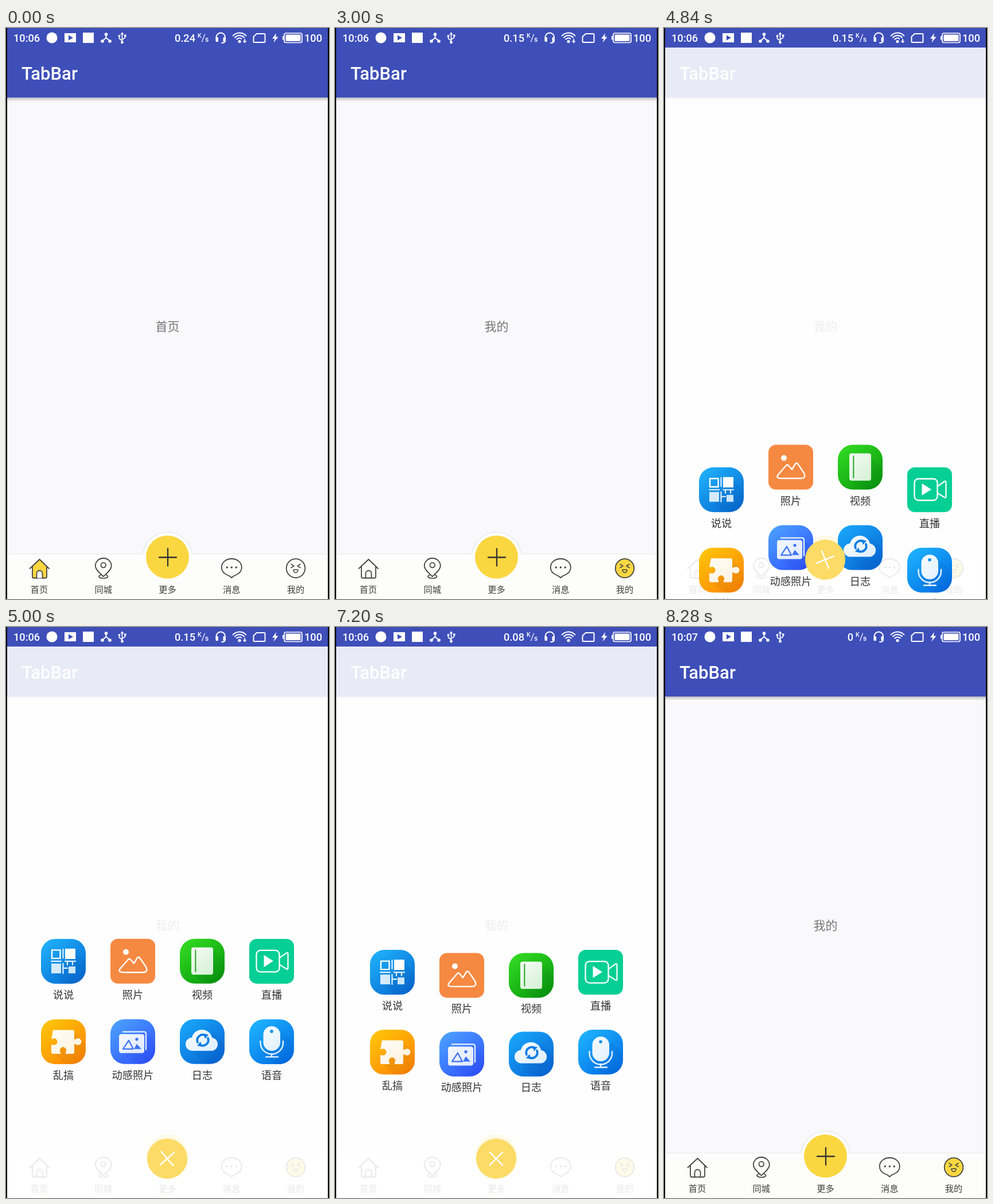
Recreate the animation shown at these times as an HTML page with a canvas. Size 563 by 994 pixels, loop 8.32 s.

```html
<!DOCTYPE html>
<html lang="zh">
<head>
<meta charset="utf-8">
<style>
html, body { margin: 0; width: 100%; height: 100%; overflow: hidden; background: #fafafa; }
canvas { display: block; }
</style>
</head>
<body>
<canvas id="stage" width="563" height="994"></canvas>
<script>
const W = 563, H = 994, LOOP = 8320;
const ctx = document.getElementById('stage').getContext('2d');
const CJK = '"Noto Sans CJK SC", "Noto Sans CJK", sans-serif';
const LATIN = 'Roboto, sans-serif';
const BLUE = '#3e4fb9', YELLOW = '#fad741', INK = '#444';
const TABS = ['首页', '同城', '更多', '消息', '我的'];

const clamp = (v, lo = 0, hi = 1) => Math.min(hi, Math.max(lo, v));

function fill(path, color) {
  ctx.fillStyle = color;
  ctx.fill(typeof path === 'string' ? new Path2D(path) : path);
}
function stroke(path, color, width) {
  ctx.strokeStyle = color;
  ctx.lineWidth = width;
  ctx.stroke(typeof path === 'string' ? new Path2D(path) : path);
}
function rect(x, y, w, h, color) {
  ctx.fillStyle = color;
  ctx.fillRect(x, y, w, h);
}
function round(x, y, w, h, r) {
  const p = new Path2D();
  p.roundRect(x, y, w, h, r);
  return p;
}
function circle(x, y, r) {
  const p = new Path2D();
  p.arc(x, y, r, 0, Math.PI * 2);
  return p;
}
function text(str, x, y, font, color, align = 'left') {
  ctx.font = font;
  ctx.fillStyle = color;
  ctx.textAlign = align;
  ctx.fillText(str, x, y);
}
function diagonal(from, to, size = 78) {
  const g = ctx.createLinearGradient(size * 0.1, 0, size * 0.9, size);
  g.addColorStop(0, from);
  g.addColorStop(1, to);
  return g;
}
function at(x, y, draw) {
  ctx.save();
  ctx.translate(x, y);
  draw();
  ctx.restore();
}

// Status bar
function drawStatus(t) {
  const white = '#fff', font = '500 18.2px ' + LATIN;
  rect(0, 0, W, 34, BLUE);
  text(t < 8240 ? '10:06' : '10:07', 13, 24, font, white);
  fill(circle(80, 17, 9.5), white);
  fill('M102 9H122V25H102Z', white);
  fill('M109 12.5L117 17L109 21.5Z', BLUE);
  fill('M134 8H153V26H134Z', white);

  stroke('M174.5 11V17L168 22.5M174.5 17L181 22.5', white, 2);
  for (const [x, y] of [[174.5, 11], [168, 23], [181, 23]]) fill(circle(x, y, 2.8), white);

  stroke('M202.5 10V25M202.5 22L197.5 18.5V14M202.5 20L207.5 17V13', white, 1.6);
  fill('M202.5 7L205.5 11.5H199.5ZM206 11.5H209.5V15H206Z', white);
  fill(circle(197.5, 14, 2), white);
  fill(circle(202.5, 25, 2.4), white);

  const speed = t < 2240 ? '0.24' : t < 5240 ? '0.15' : t < 8240 ? '0.08' : '0';
  text(speed, 330, 24, font, white, 'right');
  text('K', 334, 17, '500 10.5px ' + LATIN, white);
  text('s', 347, 24, '500 12px ' + LATIN, white);
  stroke('M341.5 24L346.5 11', white, 1.2);

  stroke('M366.5 19V15.5A7.8 7.8 0 0 1 382 15.5V22Q382 26 376 26', white, 2);
  fill(round(365.5, 16, 4.5, 8, 1.5), white);
  fill(round(378.5, 16, 4.5, 8, 1.5), white);

  for (const r of [6.5, 11, 15.5]) {
    const arc = new Path2D();
    arc.arc(407, 24, r, -Math.PI * 0.76, -Math.PI * 0.24);
    stroke(arc, white, 2.1);
  }
  fill(circle(407, 23.5, 2.6), white);
  if (t < 5800) {
    rect(411, 18, 10, 9, BLUE);
    fill('M415.2 19H417V22.5H419.5L416 26.5L412.7 22.5H415.2Z', white);
  }
  stroke('M437 10H450Q451.5 10 451.5 11.5V23.5Q451.5 25 450 25H433Q431.5 25 431.5 23.5V15Z', white, 2);
  fill('M471 9L464 18.5H468.5L466.5 25.5L474.5 15.5H470Z', white);
  stroke(round(485, 9, 31, 16.5, 3), white, 1.7);
  fill(round(487.5, 11.5, 26, 11.5, 1), white);
  rect(482, 14, 2.5, 6.5, white);
  text('100', 520, 24, font, white);
}

// Tab bar icons, each centred on its own origin
const tabIcons = {
  0(tone) {
    const body = 'M-12 -3V14.5Q-12 17 -9.5 17H10.5Q13 17 13 14.5V-3L0.5 -15Z';
    if (tone) fill(body, tone);
    stroke('M-16.5 0.5L0.5 -15.5L17 0.5M-12 -3V14.5Q-12 17 -9.5 17H10.5Q13 17 13 14.5V-3', INK, 1.8);
    const door = 'M-4.5 17V9A5 5 0 0 1 5.5 9V17';
    if (tone) fill(door, '#fdfdfc');
    stroke(door, INK, 1.8);
  },
  1(tone) {
    const pin = 'M0 14.5C-5 9 -14 3 -14 -4A14 13.5 0 0 1 14 -4C14 3 5 9 0 14.5Z';
    if (tone) fill(pin, tone);
    stroke(pin, INK, 1.8);
    if (tone) fill(circle(0, -5.5, 4.3), '#fdfdfc');
    stroke(circle(0, -5.5, 4.3), INK, 1.7);
    stroke('M-4.5 11.5C-11 14 -7 17.5 0 17.5S11 14 4.5 11.5', INK, 1.7);
  },
  3(tone) {
    const bubble = 'M0 16.5Q-4 12.5 -8 11.5C-14 9 -17.5 4 -17.5 -1.5C-17.5 -10.5 -9.5 -16.5 0 -16.5S17.5 -10.5 17.5 -1.5C17.5 4 14 9 8 11.5Q4 12.5 0 16.5Z';
    if (tone) fill(bubble, tone);
    stroke(bubble, INK, 1.8);
    for (const x of [-8, 0, 8]) fill(circle(x, -1.5, 1.7), INK);
  },
  4(tone) {
    if (tone) fill(circle(0, 0, 16.3), tone);
    stroke(circle(0, 0, 16.3), INK, 1.8);
    stroke('M-8 -7L-3 -4L-8 -1M8 -7L3 -4L8 -1', INK, 1.6);
    stroke('M-3.8 2.5H3.8V3.5A3.8 4 0 0 1 -3.8 3.5Z', INK, 1.6);
  }
};

function drawPage(t) {
  const active = t < 1880 ? 0 : t < 2520 ? 1 : t < 2960 ? 3 : 4;
  rect(0, 0, W, H, '#f9f9fb');
  const shadow = ctx.createLinearGradient(0, 121, 0, 128);
  shadow.addColorStop(0, 'rgba(0,0,0,.24)');
  shadow.addColorStop(1, 'rgba(0,0,0,0)');
  rect(0, 121, W, 7, shadow);
  rect(0, 34, W, 87, BLUE);
  text('TabBar', 27, 90, '500 31px ' + LATIN, '#fff');
  text(TABS[active], 281.5, 527, '350 21px ' + CJK, '#757575', 'center');

  stroke(circle(281.5, 921, 43), '#ebecf1', 2.5);
  rect(0, 915, W, 79, '#fdfdfc');
  rect(0, 915, W, 1.3, '#ebecf0');
  fill(circle(281.5, 921, 42.5), '#fdfdfd');
  fill(circle(281.5, 921, 37.5), YELLOW);
  stroke('M267 921.5H297M282 906.5V936.5', '#333', 2.3);

  TABS.forEach((label, i) => {
    const x = 58 + i * 111.75;
    if (tabIcons[i]) at(x, 940.5, () => tabIcons[i](i === active && YELLOW));
    text(label, x, 983, '15.2px ' + CJK, '#3c3c3c', 'center');
  });
}

// Menu tiles on a 78 x 78 grid
const TILES = [
  { label: '说说', colors: ['#20b2fb', '#0568d0'], radius: 25, draw() {
    stroke('M19 19.5H33.5V34H19Z', '#fff', 2.4);
    rect(42, 17, 18, 18, '#fff');
    rect(18, 43, 17, 17, '#d5ebfd');
    rect(48, 48, 12, 12, '#cde6fc');
    stroke('M38.5 18V33M18 39H35M42 39H60M46 39V45M55 39V45M38.5 43V60M38.5 51H46', '#e3f2fe', 2.2);
  } },
  { label: '照片', colors: ['#f68942', '#f68942'], radius: 13, draw() {
    fill(circle(27, 23, 5), '#fff');
    stroke('M17 52L31 36Q33 34 35 36L41 43L47 33Q49 31 51 33L62 49Q66 58 57 58.5H22Q12 58 17 52Z', '#fff', 2.4);
  } },
  { label: '视频', colors: ['#34dd24', '#06950a'], radius: 26, draw() {
    fill(round(20, 15, 38, 47.5, 4), diagonal('#fff', '#c9edc9'));
    rect(26.5, 19, 1.8, 39, '#169b14');
  } },
  { label: '直播', colors: ['#05cf95', '#05cf95'], radius: 13, draw() {
    stroke(round(12.5, 20, 40, 37.5, 7), '#fff', 2.3);
    stroke('M53 33L65 24.5Q67.5 23.5 67.5 26V51Q67.5 53.5 65 52.5L53 45', '#fff', 2.2);
    fill('M25.5 28L42 38.5L25.5 49Z', '#fff');
  } },
  { label: '乱搞', colors: ['#ffc60a', '#ff8300'], radius: 24, draw() {
    fill('M21 18.5H55Q58 18.5 58 21.5V35L61 34.5A5.8 5.8 0 1 1 61 43.5L58 43V57Q58 60 55 60H43V57A5.5 5.5 0 1 0 34 57V60H21Q18 60 18 57V44L21 44.5A5.8 5.8 0 1 0 21 33.5L18 34Z',
      diagonal('#fff', '#fff0d8'));
  } },
  { label: '动感照片', colors: ['#4ba2ff', '#3050ff'], radius: 25, draw() {
    stroke('M22 22H58Q62 22 62 26V53', '#e6efff', 2.3);
    fill(round(15, 26, 44, 33, 4), diagonal('#fff', '#d5e2ff'));
    stroke('M22 52L32 37L40 52Z', '#3d72f5', 2.2);
    fill('M41 52L46 43L54 52Z', '#3d72f5');
    fill(circle(46, 35, 2.6), '#3d72f5');
  } },
  { label: '日志', colors: ['#19a8fa', '#0764d4'], radius: 25, draw() {
    fill('M22 55A11.5 11.5 0 0 1 21 32A18 18 0 0 1 56 32A11.7 11.7 0 0 1 57 55Z', diagonal('#fff', '#d6eafd'));
    stroke('M31 40A9.5 9.5 0 0 1 44 28M49 33A9.5 9.5 0 0 1 36 45', '#0d7de2', 3.8);
    fill('M41 25L50 27L44 34ZM39 48L30 46L36 39Z', '#0d7de2');
  } },
  { label: '语音', colors: ['#1fb5ff', '#006be4'], radius: 25, draw() {
    fill(round(24.5, 12, 29.5, 43, 14.8), diagonal('#fff', '#d5ecff'));
    fill(circle(39, 21, 2.8), '#1290ef');
    stroke('M19.5 38V41A19.7 19.5 0 0 0 59 41V38M39 60V65M29 65.5H50', '#e8f4ff', 2.4);
  } }
];

// Remaining distance of a damped spring, from 1 to 0
function spring(ms) {
  const a = Math.max(0, ms) * 0.0116;
  return Math.exp(-1.07 * a) * (Math.cos(a) + 1.07 * Math.sin(a));
}

// Row by row, inner columns leave before the outer ones
const EXITS = {
  inner: [{ start: 7175, pull: 0.0095 }, { start: 7180, pull: 0.0078 }],
  outer: [{ start: 7188, pull: 0.0064 }, { start: 7199, pull: 0.0048 }]
};

function tileOffset(row, col, t) {
  const side = col === 1 || col === 2 ? 'inner' : 'outer';
  const exit = EXITS[side][row];
  const enter = 528 * spring(t - (side === 'inner' ? 4727 : 4739));
  return enter + exit.pull * Math.max(0, t - exit.start) ** 2;
}

function drawTile(tile, x, y) {
  at(x, y, () => {
    const plate = round(0, 0, 78, 78, tile.radius);
    fill(plate, diagonal(...tile.colors));
    if (tile.colors[0] !== tile.colors[1]) {
      ctx.save();
      ctx.clip(plate);
      fill('M58 22L80 44V80H44L22 58Z', 'rgba(0,30,90,.05)');
      ctx.restore();
    }
    tile.draw();
    text(tile.label, 39, 104, '18.2px ' + CJK, '#333', 'center');
  });
}

function drawMenu(t) {
  const alpha = Math.min(clamp((t - 4610) / 120), clamp((7570 - t) / 120));
  if (t < 4640 || t >= 7560) return;
  ctx.save();
  ctx.globalAlpha = alpha;
  ctx.beginPath();
  ctx.rect(0, 34, W, H - 34);
  ctx.clip();
  rect(0, 34, W, H - 34, 'rgba(255,255,255,.88)');
  TILES.forEach((tile, i) => {
    const row = i >> 2, col = i & 3;
    const y = 561 + row * 140 + tileOffset(row, col, t);
    if (y < H) drawTile(tile, 61 + col * 121, y);
  });
  fill(circle(281, 925.5, 35), '#fcdb66');
  const back = 15 * (Math.max(0, t - 7180) / 220) ** 2;
  at(281, 925.5, () => {
    ctx.rotate((135 * (1 - spring(t - 4755)) - back) * Math.PI / 180);
    stroke('M-16 0H16M0 -16V16', '#fff', 2.5);
  });
  ctx.restore();
}

function render() {
  const t = performance.now() % LOOP;
  ctx.lineCap = ctx.lineJoin = 'round';
  drawPage(t);
  drawMenu(t);
  drawStatus(t);
  rect(0, 0, 2, H, '#000');
  rect(561, 0, 2, H, '#000');
  requestAnimationFrame(render);
}
render();
</script>
</body>
</html>
```
